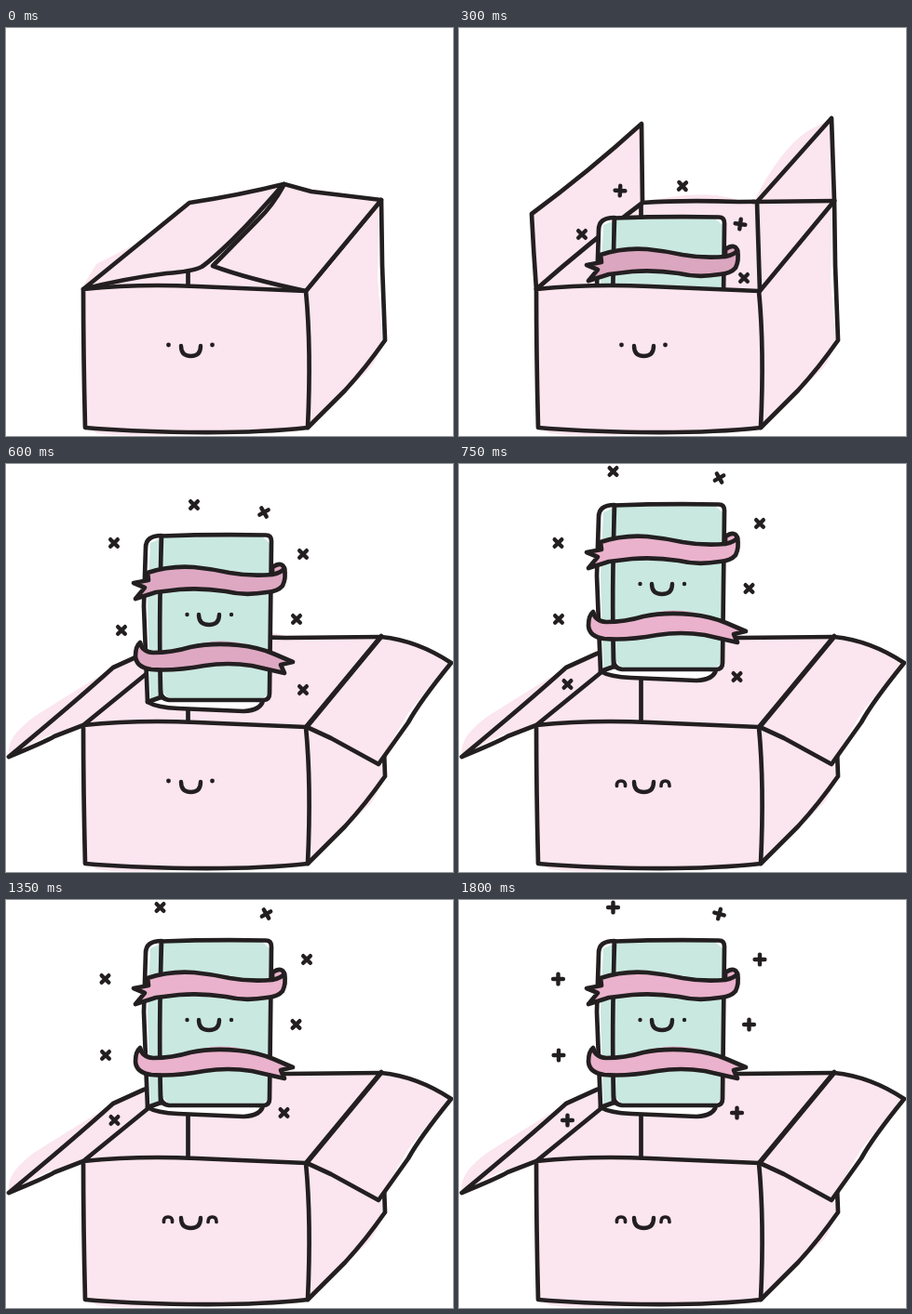
Recreate the animation shown at these times as an HTML page with a canvas. Size 480 by 439 pixels, loop 1.95 s.

```html
<!DOCTYPE html>
<html lang="en">
<head>
<meta charset="utf-8">
<title>Book in a box</title>
<style>
html, body { margin: 0; width: 100%; height: 100%; overflow: hidden; background: #fff; }
canvas { display: block; width: 480px; height: 439px; }
</style>
</head>
<body>
<canvas id="stage" width="480" height="439"></canvas>
<script>
const ctx = document.getElementById('stage').getContext('2d');
const INK = '#231f20', PINK = '#fbe5ee', TEAL = '#c9e8e0';
const STEP = 150, STEPS = 13;

const fill = (d, color) => { ctx.fillStyle = color; ctx.fill(new Path2D(d)); };
const line = (d, width = 4.7) => { ctx.lineWidth = width; ctx.stroke(new Path2D(d)); };
const shape = (d, color) => { fill(d, color); line(d); };

function dot(x, y, r = 2.4) {
  ctx.fillStyle = INK;
  ctx.beginPath();
  ctx.arc(x, y, r, 0, Math.PI * 2);
  ctx.fill();
}

// Marks are [x, y, rotation in degrees]; 0 is a plus, 45 a cross.
function sparkle([x, y, turn = 45], extra = 0) {
  ctx.save();
  ctx.translate(x, y);
  ctx.rotate((turn + extra) * Math.PI / 180);
  line('M-5.4 0H5.4M0 -5.4V5.4', 4.4);
  ctx.restore();
}

function inside() {
  fill('M83 281L197 188Q260 172 300 185L403 186L322 284Z', PINK);
  line('M83 281Q134 235 178 200Q188 191 197 188Q240 185 300 187L403 186');
  line('M195.5 189V278');
}

function side() {
  fill('M322 283L400 188L399 270L404 334Q401 354 391 366L324 430Z', PINK);
  line('M322 283L403 185L404 255L407 336Q386 366 364 390L324 430');
}

function front(happy) {
  fill('M83 281Q150 273 215 278L322 283Q329 350 324 430Q270 437 195 436Q130 441 97 436L86 428Z', PINK);
  line('M83 281Q140 275 205 278L322 283Q328 345 324 430Q270 436 195 435Q130 434 85 430Q83 350 83 281Z');
  if (happy) {
    line('M169.5 346.5Q169 341 174 341Q179 341 178.5 346.5M217 346.5Q217 341 221.5 341Q226 341 226 346.5', 3.7);
  } else {
    dot(174.5, 341);
    dot(221.5, 341);
  }
  line('M188 342Q188 353 198.5 353Q209 353 209 342', 4.4);
}

const closedFlaps = () => {
  fill('M83 281L197 188L298 168L403 185L322 283Z', PINK);
  fill('M82 279L97 254L140 232Z', PINK);
  line('M195.5 262V278');
  line('M83 281L197 188Q250 180 298 168Q268 203 243 228Q218 252 210 257Q200 262 172 264Q125 270 83 281');
  line('M322 283L403 185L328 176L299 168Q286 192 270 207L222 256Q260 270 322 283Z');
};

const risingFlaps = () => {
  shape('M83 281L152 212L252 124L197 188Z', PINK);
  shape('M322 283L265 207L346 124L403 186Z', PINK);
};

const raisedFlaps = () => {
  shape('M78 200Q140 154 196 103L197 188Q140 231 83 281Q80 240 78 200Z', PINK);
  fill('M322 283L317 186Q344 132 374 111L399 98L403 186Z', PINK);
  line('M323 283L320 187L400 97L403 186Z');
  line('M315 187L403 186');
};

const openFlaps = () => {
  fill('M83 281L45 292L3 314C1 296 15 284 30 272Q68 248 115 219L197 188Z', PINK);
  line('M197 188L148 204L115 219Q73 257 3 315Q42 299 52 293L83 281L197 188');
  fill('M323 283L403 186Q440 190 474 215L432 268L402 319Z', PINK);
  line('M323 283L403 186Q442 190 478 214Q444 256 432 278L400 323L349 295Z');
};

function ribbons(color) {
  shape('M286 78Q297 71 299 80L298 90L286 86Z', color);
  shape('M152 84Q176 76 202 78Q222 80 240 84Q262 88 286 86Q296 84 299 79' +
    'Q301 90 297 98Q292 104 280 105Q256 109 236 104Q210 100 186 102L161 105L139 112L149 100L137 95L153 92Z', color);
  fill('M190 166Q235 147 284 170L240 174Z', color);
  shape('M144 159Q146 169 158 170Q178 170 198 164Q222 159 250 162Q270 164 287 171L308 180L295 183L299 192' +
    'L264 184Q238 180 213 184Q180 190 156 188Q140 186 139 174Q139 163 144 159Z', color);
}

function book(dx, dy, color) {
  ctx.save();
  ctx.translate(dx, dy);
  shape('M152 223Q162 229 185 230L255 233Q274 232 276 221L166 218Z', '#fff');
  const spine = 'M167 44Q150 44 150 57L148 120Q150 175 152 223L166 218Z';
  fill(spine, '#fff');
  fill('M167 47L155 52L152 120L155 220L166 218Z', TEAL);
  line(spine);
  const cover = 'M167 44.5Q220 42.5 279 43.5Q285 43.5 285 50L284 130L283 214Q283 221 276 221' +
    'L175 221Q166 220 166 210Q164 140 167 44.5Z';
  fill(cover, '#fff');
  fill('M168 46L275 45L283 52L281 215L274 220L174 219L167 210Z', TEAL);
  line(cover);
  dot(194.5, 129, 2.2);
  dot(242, 129, 2.2);
  line('M207 129Q207 140 218 140Q229 140 229 129', 4.4);
  ribbons(color);
  ctx.restore();
}

const poses = [
  { flaps: closedFlaps },
  { flaps: risingFlaps },
  { flaps: raisedFlaps, book: [0, 160, '#dba6bf'],
    marks: [[173, 175, 3], [240, 170, 48], [132, 222], [302, 211, 8], [306, 269]] },
  { flaps: openFlaps, book: [2, 106, '#ecb3cd'],
    marks: [[210, 125], [129, 162, 3], [309, 170, 15], [306, 240], [133, 256]] },
  { flaps: openFlaps, book: [0, 33, '#dea8c3'],
    marks: [[202, 44], [277, 52, 60], [116, 85], [319, 97], [312, 167], [124, 179], [319, 243]] },
  { flaps: openFlaps, book: [0, 0, '#eab2cc'], happy: true,
    marks: [[165.5, 8], [279.5, 15, 60], [106.5, 85], [323, 64], [311.5, 134], [107, 167], [116.5, 237], [298.5, 229]] }
];

function draw(now) {
  const step = Math.floor(now / STEP) % STEPS;
  const last = poses.length - 1;
  const pose = poses[Math.min(step, last)];
  // Once the book is out, the marks twinkle between cross and plus.
  const twinkle = step > last && (step - last) % 2 ? -45 : 0;

  ctx.fillStyle = '#fff';
  ctx.fillRect(0, 0, 480, 439);
  ctx.strokeStyle = INK;
  ctx.lineCap = ctx.lineJoin = 'round';

  if (pose.flaps !== closedFlaps) inside();
  side();
  pose.flaps();
  if (pose.book) book(...pose.book);
  front(pose.happy);
  (pose.marks || []).forEach(mark => sparkle(mark, twinkle));
}

let start;
function tick(now) {
  start ??= now;
  draw(now - start);
  requestAnimationFrame(tick);
}
draw(0);
requestAnimationFrame(tick);
</script>
</body>
</html>
```
